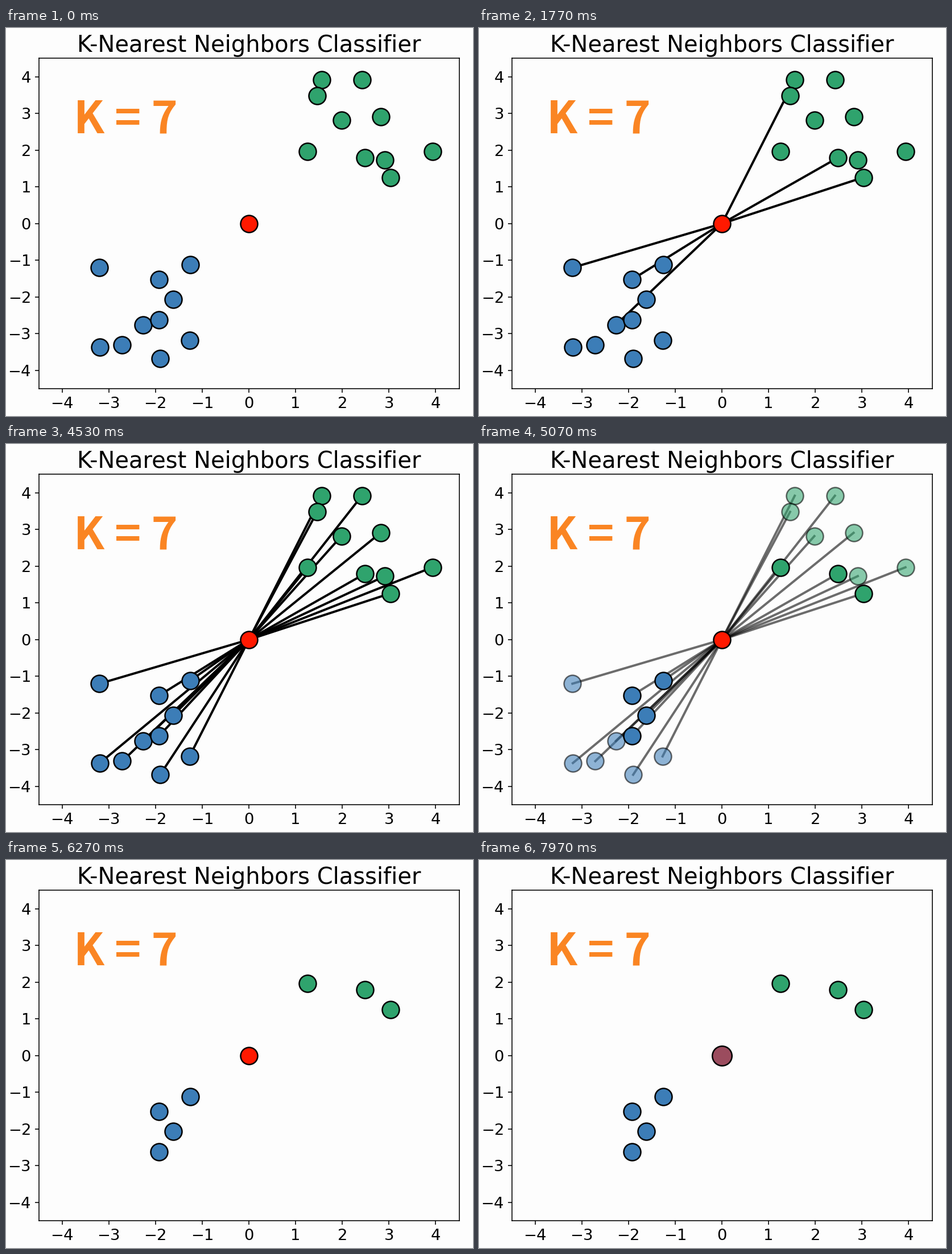
Recreate the animation shown at these times as a matplotlib script. Size 821 by 682 pixels, loop 8000 ms.

```python
import numpy as np
import matplotlib.pyplot as plt
from matplotlib.animation import FuncAnimation
from matplotlib.colors import to_rgb

W, H, DPI = 821, 682, 144
FRAMES, STEP = 250, 32  # 8000 ms

GREEN, BLUE, RED = "#2fa36d", "#3c7db7", "#ff1900"
BACK, ORANGE = "#fdfdfd", "#fa8523"
DOT, EDGE = 15, 1.25
K = 7

LINK_START, LINK_GAP = 900, 400 / 3
FADE_START, FADE_TIME = 4790, 620
TURN_START, TURN_TIME = 7650, 620

# The two classes, in the order their points get connected.
blue = np.transpose([
    [-3.2, -1.92, -2.27, -3.19, -1.25, -1.9, -1.27, -2.71, -1.62, -1.92],
    [-1.2, -1.52, -2.76, -3.36, -1.11, -3.68, -3.18, -3.31, -2.06, -2.62]])
green = np.transpose([
    [1.56, 2.49, 3.03, 2.42, 3.93, 2.82, 1.98, 1.25, 1.46, 2.91],
    [3.92, 1.8, 1.26, 3.92, 1.97, 2.91, 2.82, 1.96, 3.48, 1.73]])


def progress(t, start, length):
    return min(max((t - start) / length, 0), 1)


def mix(a, b, p):
    return (1 - p) * np.array(to_rgb(a)) + p * np.array(to_rgb(b))


def dots(xy, color, z):
    return ax.plot(*xy.T, "o", ms=DOT, color=color, mec="black",
                   mew=EDGE, zorder=z)[0]


plt.rcParams["font.family"] = "DejaVu Sans"
eps = 1e-6  # guards against rounding down a pixel
fig = plt.figure(figsize=((W + eps) / DPI, (H + eps) / DPI), dpi=DPI,
                 facecolor=BACK)
ax = fig.add_axes([57.5 / W, 1 - 634.25 / H, 739 / W, 580.75 / H],
                  facecolor=BACK)
ax.set(xlim=(-4.5, 4.5), ylim=(-4.5, 4.5),
       xticks=range(-4, 5), yticks=range(-4, 5))
ax.tick_params(labelsize=13.7, pad=3.2)
ax.set_title("K-Nearest Neighbors Classifier", fontsize=20)
fig.text(119 / W, 1 - 184.5 / H, f"K = {K}", color=ORANGE, fontsize=39.4,
         family="Noto Sans CJK JP", weight="bold", va="baseline")

# Links alternate between the classes.
points = np.stack([blue, green], axis=1).reshape(-1, 2)
links = [ax.plot([0, x], [0, y], color="black", lw=2, zorder=2)[0]
         for x, y in points]

reach = np.sort(np.hypot(*points.T))[K - 1]
far_dots = []
for group, color in ((blue, BLUE), (green, GREEN)):
    near = np.hypot(*group.T) <= reach
    far_dots.append(dots(group[~near], color, 3))
    dots(group[near], color, 4)
query = dots(np.zeros((1, 2)), RED, 5)


def draw(i):
    t = i * STEP
    alpha = 1 - progress(t, FADE_START, FADE_TIME)
    shown = int((t - LINK_START) / LINK_GAP)
    for n, link in enumerate(links):
        link.set_visible(n < shown and alpha > 0)
    for artist in links + far_dots:
        artist.set_alpha(alpha)

    # The query point swells while it takes the winning colour.
    p = progress(t, TURN_START, TURN_TIME)
    query.set_markerfacecolor(mix(RED, BLUE, p))
    query.set_markersize(DOT * (1 + 0.15 * np.sin(np.pi * p)))
    return [*links, *far_dots, query]


anim = FuncAnimation(fig, draw, frames=FRAMES, interval=STEP,
                     repeat=True, repeat_delay=0)
plt.show()
```
